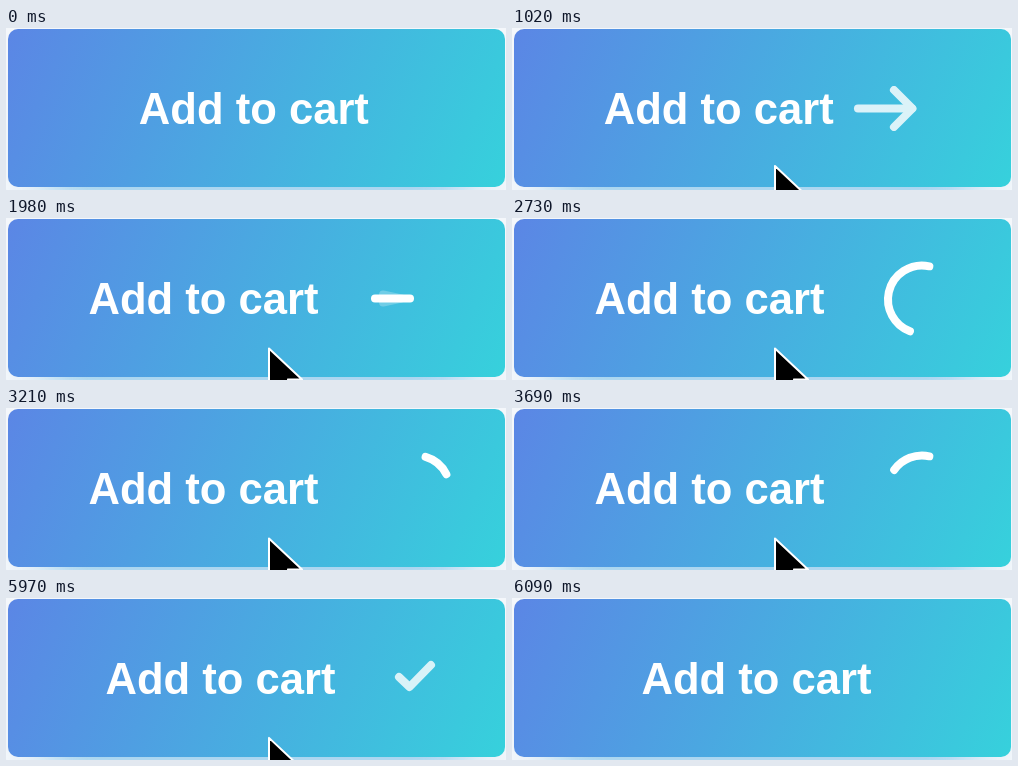
An HTML page for the animation above (6.33 s loop, 500 by 162 pixels).

```html
<!DOCTYPE html>
<html lang="en">
<head>
<meta charset="utf-8">
<title>Add to cart</title>
<style>
  html, body { margin: 0; width: 100%; height: 100%; overflow: hidden; background: #f4f7fb; }
  #stage { position: absolute; left: 0; top: 0; width: 500px; height: 162px; overflow: hidden; }
  #button {
    position: absolute; left: 1.5px; top: 1px; width: 497.5px; height: 158px;
    border-radius: 10px;
    background: linear-gradient(113deg, #5b86e5, #36d1dc);
    box-shadow: 0 45px 50px -40px rgba(60, 165, 225, .7);
  }
  svg { position: absolute; left: 0; top: 0; }
  text { font: bold 43.6px "Liberation Sans", Arial, sans-serif; fill: #fff; }
  .stroke { fill: none; stroke: #fff; stroke-width: 8; stroke-linecap: round; stroke-linejoin: round; }
</style>
</head>
<body>
<div id="stage">
  <div id="button"></div>
  <svg width="500" height="162" viewBox="0 0 500 162">
    <text id="label" y="95.600">Add to cart</text>
    <g id="arrow" class="stroke">
      <path id="head"/>
      <path id="shaft"/>
    </g>
    <circle id="ring" class="stroke" cx="410" cy="81.5" r="34" pathLength="360" transform="rotate(-77.5 410 81.5)"/>
    <path id="check" class="stroke" d="M393 79L403.500 89L425 67" pathLength="100"/>
    <path id="cursor" d="M0 0V46L11 36L18 52L26 49L19 31H33Z" fill="#000" stroke="#fff" stroke-width="2" stroke-linejoin="round"/>
  </svg>
</div>
<script>
const LOOP = 6330, STEP = 30;
const SPIN_START = 2490, SPIN = 688, SPINS = 3;
const $ = id => document.getElementById(id);
const [button, label, arrow, head, shaft, ring, check, cursor] =
  ["button", "label", "arrow", "head", "shaft", "ring", "check", "cursor"].map($);

const easeOut = p => 1 - (1 - p) ** 2;
const linear = p => p;

// Value at t along [time, value] stops
function track(t, stops, ease = linear) {
  if (t <= stops[0][0]) return stops[0][1];
  for (let i = 1; i < stops.length; i++) {
    const [t0, a] = stops[i - 1], [t1, b] = stops[i];
    if (t < t1) return a + (b - a) * ease((t - t0) / (t1 - t0));
  }
  return stops[stops.length - 1][1];
}

function show(el, opacity) {
  el.style.opacity = opacity;
  el.style.visibility = opacity > 0 ? "visible" : "hidden";
}

// Visible stretch of a path, in its own pathLength units
function dash(el, from, to) {
  const len = Math.max(0, to - from);
  el.setAttribute("stroke-dasharray", len + " 2000");
  el.setAttribute("stroke-dashoffset", -from);
  return len > 0;
}

function drawArrow(t) {
  const enter = track(t, [[900, 0], [1110, 1]], easeOut);
  arrow.setAttribute("transform", `translate(${-22 * (1 - enter)} 0)`);
  show(arrow, t < 2400 ? enter : 0);

  const left = track(t, [[1740, 350], [1980, 369], [2400, 404]]);
  shaft.setAttribute("d", `M${left} 80.5H404`);

  const fold = track(t, [[1710, 0], [1980, 1]]);
  const tip = 404.5 - 9 * fold, rise = 18.5 - 14.5 * fold;
  head.setAttribute("d", `M${tip - 18.5} ${80.5 - rise}L${tip} 80.5L${tip - 18.5} ${80.5 + rise}`);
  show(head, track(t, [[1710, 1], [1980, .25], [2040, 0]]));
}

function drawRing(t) {
  const turn = (t - SPIN_START) / SPIN;
  if (turn < 0 || turn >= SPINS) return show(ring, 0);
  const p = turn % 1;
  const front = track(p, [[0, 0], [.33, 360]]);
  const back = track(p, [[.04, 0], [.35, 189], [1, 360]]);
  show(ring, dash(ring, back, front) ? 1 : 0);
}

function draw(t) {
  const scale = track(t, [[1590, 1], [1620, .988], [1680, .975], [1740, .975], [1890, 1]]);
  button.style.transform = `scale(${scale})`;

  const x = t < 3000
    ? track(t, [[900, 132.8], [1110, 82.5]], easeOut)
    : track(t, [[5940, 82.5], [6090, 129.5]], easeOut);
  label.setAttribute("x", x);

  drawArrow(t);
  drawRing(t);

  const drawn = dash(check, 0, track(t, [[4560, 0], [4980, 100]]));
  show(check, drawn ? track(t, [[5940, 1], [6090, 0]]) : 0);

  const y = track(t, [[900, 168], [1050, 130.5], [5940, 130.5], [6060, 168]]);
  cursor.setAttribute("transform", `translate(263 ${y})`);
}

const start = performance.now();
function tick() {
  const t = (performance.now() - start) % LOOP;
  draw(Math.floor(t / STEP) * STEP);
  requestAnimationFrame(tick);
}
draw(0);
requestAnimationFrame(tick);
</script>
</body>
</html>
```
